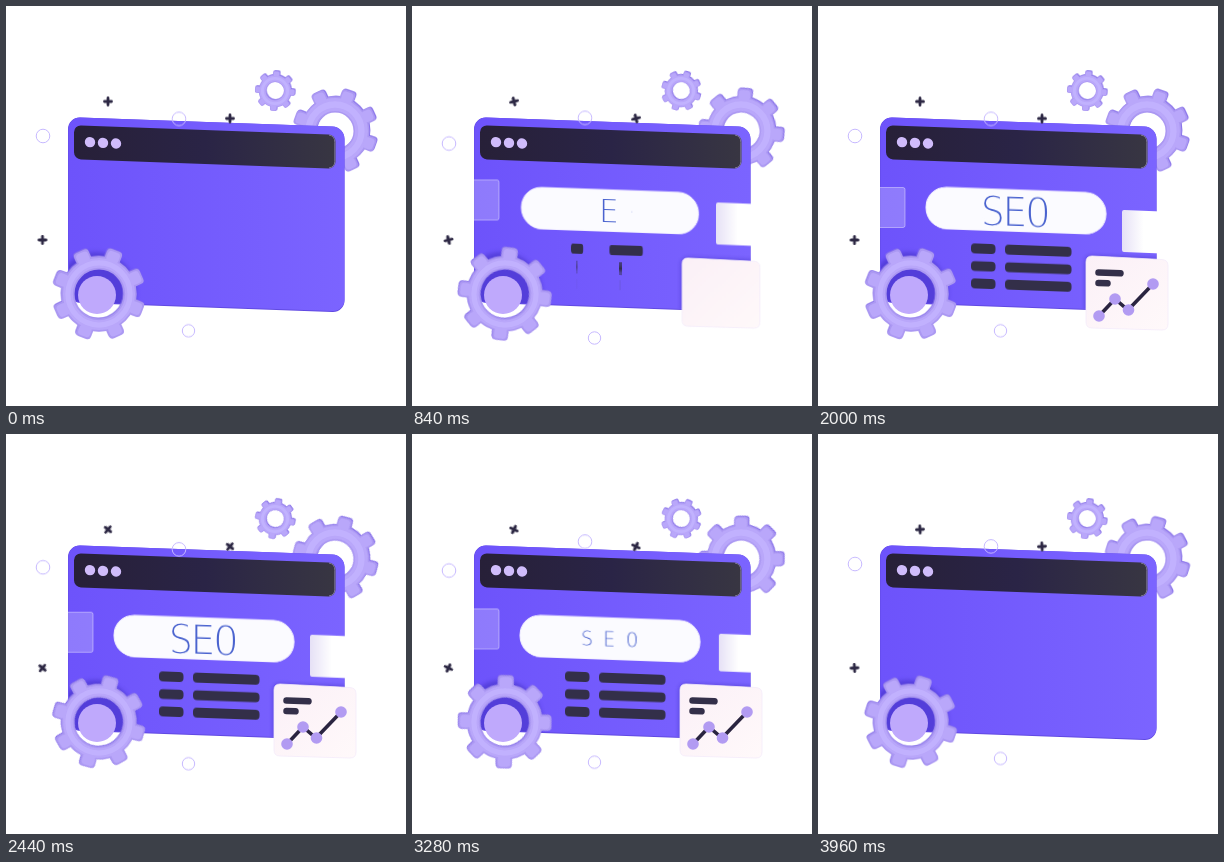
Recreate the animation shown at these times as an HTML page. Size 400x400 px, loop 4000 ms.

```html
<!DOCTYPE html>
<html lang="en">
<head>
<meta charset="utf-8">
<title>Search window</title>
<style>
html, body { margin: 0; width: 100%; height: 100%; overflow: hidden; background: #fff; }
svg { display: block; width: 100vw; height: 100vh; }
.spin { animation: spin 4s linear infinite; }
.back { animation-direction: reverse; }
.bob { animation: bob 1s cubic-bezier(.37, 0, .63, 1) infinite alternate; }
@keyframes spin { to { transform: rotate(360deg); } }
@keyframes bob { from { transform: translateY(4px); } to { transform: translateY(-4px); } }
.ink { fill: #332f49; }
.ring { fill: none; stroke: #c6b8ff; stroke-width: 1; }
.shade { fill: #4230c4; opacity: .6; filter: blur(2px); }
.letters text {
  font: 42px "DejaVu Sans Mono", monospace; text-anchor: middle;
  fill: #4a63cf; stroke: #fbfbff; stroke-width: 2.2;
}
</style>
</head>
<body>
<svg viewBox="0 0 400 400">
  <defs>
    <linearGradient id="body">
      <stop offset="0" stop-color="#6d53fb"/>
      <stop offset="1" stop-color="#7b64ff"/>
    </linearGradient>
    <linearGradient id="bar">
      <stop offset="0" stop-color="#272038"/>
      <stop offset=".5" stop-color="#2a2446"/>
      <stop offset="1" stop-color="#383642"/>
    </linearGradient>
    <linearGradient id="glass">
      <stop offset="0" stop-color="#e6e1f6"/>
      <stop offset=".4" stop-color="#fff"/>
    </linearGradient>
    <linearGradient id="paper" x2="1" y2="1">
      <stop offset="0" stop-color="#fbf0f7"/>
      <stop offset="1" stop-color="#fff9fa"/>
    </linearGradient>
    <clipPath id="inside"><rect x="63" y="111" width="275.5" height="184.5" rx="12"/></clipPath>
  </defs>

  <g id="backGears"></g>

  <g transform="matrix(1 .036 0 1 0 -2.23)">
    <rect x="62" y="111" width="276.5" height="185.500" rx="12" fill="#6049e2"/>
    <rect x="62.500" y="111" width="276" height="184.500" rx="12" fill="url(#body)"/>
    <rect x="68" y="119" width="261.5" height="34" rx="7" fill="url(#bar)"/>
    <path d="M323 119.7q5.8 .5 5.8 7v19q0 6-5.8 6.8" fill="none" stroke="#8d86a8" stroke-width=".8"/>
    <g fill="#d0bcfb">
      <circle cx="84" cy="135.3" r="5.2"/>
      <circle cx="97" cy="135.6" r="5.2"/>
      <circle cx="110" cy="135.8" r="5.2"/>
    </g>
    <g clip-path="url(#inside)">
      <circle class="shade" cx="91" cy="284" r="39"/>
      <rect class="shade" id="cardShade" x="267" y="242" width="84" height="73" rx="7"/>
    </g>
    <rect id="pill" x="108" y="179" width="180" height="41.5" rx="20.5" fill="#fbfbff" stroke="#f3f0ff"/>
    <g class="letters" id="letters"></g>
    <g class="ink" id="rows"></g>
  </g>

  <g class="bob">
    <rect id="leftBox" x="43" y="177.5" width="44" height="40" rx="2" fill="#fff" fill-opacity=".23" stroke="#fff" stroke-opacity=".4"/>
  </g>
  <g class="bob">
    <path id="rightBox" d="M306 200l50 2q2 0 2 2v38q0 2-2 2l-50-2q-2 0-2-2v-38q0-2 2-2z" fill="url(#glass)"/>
  </g>

  <g id="card">
    <path d="M274 250l70 3.5q6 .5 6 6v58.5q0 6-6 6l-70-2q-6 0-6-6v-60q0-6 6-6z" fill="url(#paper)" stroke="#f4ebfa" stroke-width=".8"/>
    <path id="line1" d="M280.5 266.5l22 .8" stroke="#332f49" stroke-width="6.5" stroke-linecap="round"/>
    <path id="line2" d="M280.5 277l9 .3" stroke="#332f49" stroke-width="6.5" stroke-linecap="round"/>
    <path id="chart" d="M281 310l16-17 13 11 25-26" fill="none" stroke="#2a2440" stroke-width="3.6" vector-effect="non-scaling-stroke"/>
    <g id="points" fill="#b29bf2"></g>
  </g>

  <g id="frontGear"></g>
  <circle cx="91" cy="289" r="19" fill="#bfa9fc"/>

  <circle class="ring bob" cx="37" cy="134" r="6.8" style="animation-delay:-1s"/>
  <circle class="ring bob" cx="173" cy="111.4" r="6.8" style="animation-delay:-1.62s"/>
  <circle class="ring bob" cx="182.5" cy="328" r="6.2" style="animation-delay:-1.2s"/>
  <g id="pluses"></g>
</svg>
<script>
const LOOP = 4000, SINE = "cubic-bezier(.37,0,.63,1)";
const $ = id => document.getElementById(id);

function add(parent, tag, attrs, text) {
  const el = document.createElementNS("http://www.w3.org/2000/svg", tag);
  for (const k in attrs) el.setAttribute(k, attrs[k]);
  if (text) el.textContent = text;
  return parent.appendChild(el);
}

// Grow from the origin between a and b, shrink back between c and d.
function pop(el, x, y, [a, b, c, d], flat) {
  el.style.transformOrigin = `${x}px ${y}px`;
  const off = flat ? "scale(0, 1)" : "scale(0)", on = "scale(1, 1)";
  const key = (ms, transform) => ({ offset: ms / LOOP, transform, easing: SINE });
  el.animate(
    [key(0, off), key(a, off), key(b, on), key(c, on), key(d, off), key(LOOP, off)],
    { duration: LOOP, iterations: Infinity }
  );
}

// Stacked layers give the wheel its thickness; the light ring makes it look puffed.
function gear(parent, cx, cy, tip, hole, start, edge, spin = "spin") {
  const rim = tip * .81, tooth = tip * .34, mid = (rim + hole) / 2;
  const layers = [[edge, -.8, "#8a74ea"], [0, 0, "#ab98f2"], [0, 0, "#b9a7fa"]];
  layers.forEach(([dx, dy, color], i) => {
    const inset = i == 2 ? tip * .035 : 0;
    const at = add(parent, "g", { transform: `translate(${cx + dx} ${cy + dy})` });
    const wheel = add(at, "g", { class: spin });
    add(wheel, "circle", {
      r: mid, fill: "none", stroke: color, "stroke-width": rim - hole - 2 * inset
    });
    for (let n = 0; n < 8; n++) {
      add(wheel, "rect", {
        x: rim - tip * .08, y: inset - tooth / 2, rx: tip * .08, fill: color,
        width: tip * .27 - inset, height: tooth - 2 * inset,
        transform: `rotate(${start + n * 45})`
      });
    }
  });
  add(parent, "circle", {
    cx, cy, r: mid, fill: "none", stroke: "#c5b6ff", "stroke-width": (rim - hole) * .4, opacity: .7
  });
}

gear($("backGears"), 269, 85, 20, 9, -85, .6, "spin back");
gear($("backGears"), 329, 125, 42.5, 18.5, -70, 1);
gear($("frontGear"), 93, 288, 46.5, 24.5, -69, -.6);

for (const [x, y] of [[102, 95.5], [224, 112.5], [36.5, 234]]) {
  const at = add($("pluses"), "g", { transform: `translate(${x} ${y})` });
  add(at, "path", {
    class: "spin", d: "M-3.5 0h7M0-3.5v7", stroke: "#2d2844", "stroke-width": 2.8, "stroke-linecap": "round"
  });
}

const cardTimes = [500, 900, 3440, 3830];
pop($("pill"), 198, 199.7, [400, 880, 3320, 3780], true);
pop($("leftBox"), 65, 197.5, [400, 800, 3440, 3830]);
pop($("rightBox"), 331, 222, [400, 800, 3200, 3580]);
pop($("card"), 309, 287, cardTimes);
pop($("cardShade"), 309, 278.5, cardTimes);

[["S", 175, 850], ["E", 197, 630], ["O", 220, 800]].forEach(([char, x, t]) => {
  const el = add($("letters"), "text", { x, y: 215.8 }, char);
  pop(el, x, 200.5, [t, t + 300, 3120, 3440]);
});

const rows = [[239, 640, 3420, 3320], [256.7, 785, 3480, 3410], [274, 825, 3540, 3450]];
for (const [y, t, outA, outB] of rows) {
  for (const [x, width, cx, out] of [[153, 24.5, 165, outA], [187, 66.5, 208, outB]]) {
    const bar = add($("rows"), "rect", { x, y: y - 4.9, width, height: 9.8, rx: 4 });
    pop(bar, cx, y, [t, t + 400, out, out + 400], true);
  }
}

pop($("line1"), 278, 267, [950, 1250, 3900, 3990], true);
pop($("line2"), 278, 277, [1050, 1350, 3900, 3990], true);
pop($("chart"), 288, 303, [1200, 1620, 3900, 3990]);
[[281, 310], [297, 293], [310.5, 304], [335, 278]].forEach(([cx, cy], i) => {
  const dot = add($("points"), "circle", { cx, cy, r: 5.8 });
  const t = 1170 + (i ? 150 + i * 130 : 0);
  pop(dot, cx, cy, [t, t + 220, 3900, 3990]);
});
</script>
</body>
</html>
```
